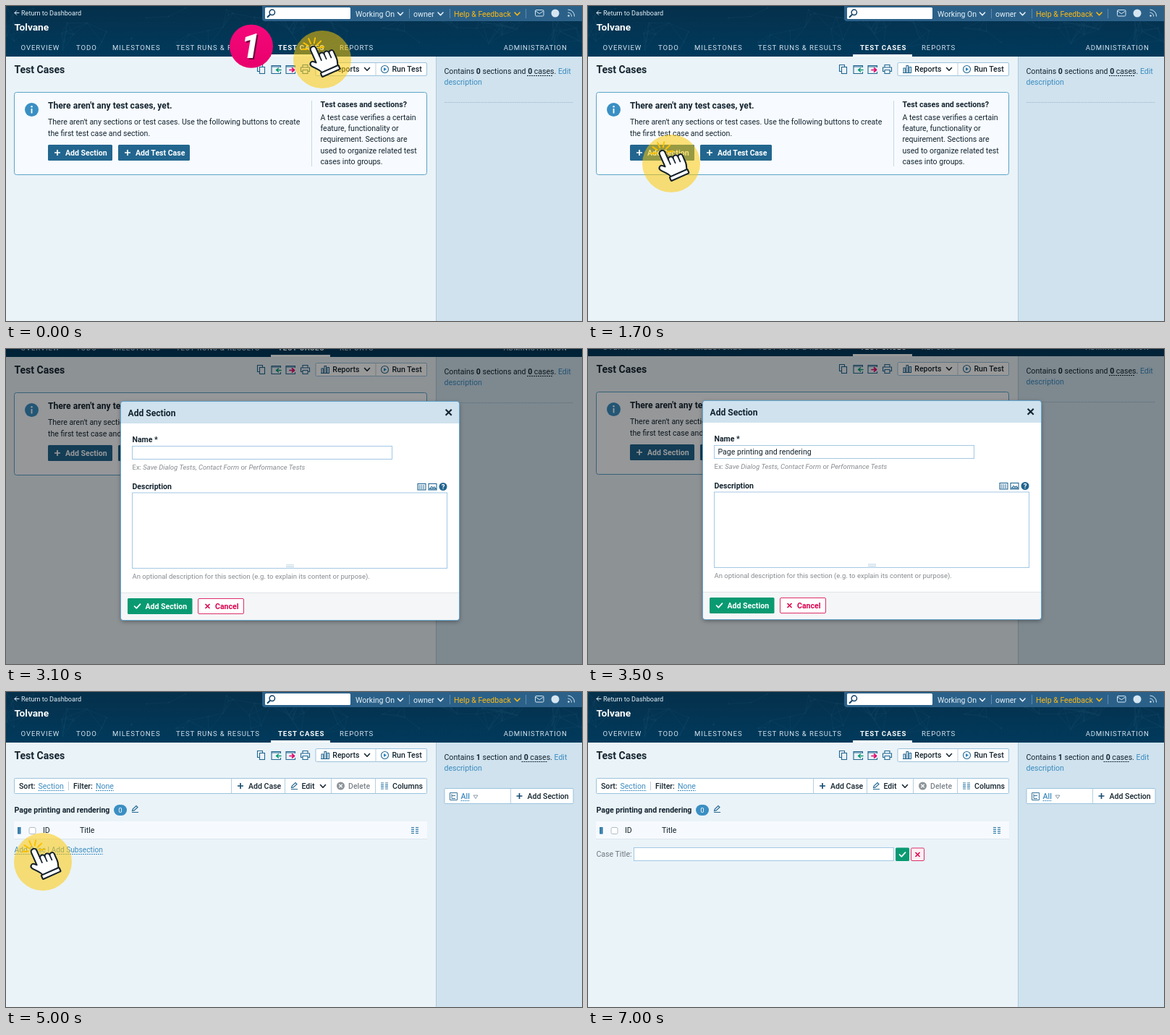
Write an HTML page that moves like this. It is 796x436 px and loops after 8 s.

```html
<!DOCTYPE html>
<html lang="en">
<head>
<meta charset="utf-8">
<title>Adding a section</title>
<style>
html, body { margin: 0; width: 100%; height: 100%; overflow: hidden; background: #eaf3f8; }
svg { display: block; }
text { font: 10.55px Roboto, Arial, sans-serif; fill: #14242f; white-space: pre; }
.m { font-weight: 500; }
.b { font-weight: 700; }
.white { fill: #fff; }
.link { fill: #3c8cc0; }
.dash { stroke: #3c8cc0; stroke-dasharray: 2 1; }
.nav text { font-size: 9.6px; letter-spacing: .9px; fill: #d3e3ee; }
.nav .b { fill: #fff; }
.top text { fill: #e6f1f8; }
.hint { font-size: 9.5px; fill: #868b8f; }
.box { fill: #fff; stroke: #9cc3dc; }
.field { fill: #fff; stroke: #a3c8e4; }
.rule { stroke: #b7d0e0; }
.ico { fill: none; stroke: #236791; stroke-width: 1.1; }
.btn { fill: #22668f; }
.pen { fill: none; stroke-linecap: round; stroke-linejoin: round; }
.digit { font: italic 800 47px Roboto, Arial, sans-serif; }
</style>
</head>
<body>
<svg width="796" height="436" viewBox="0 0 796 436">
<defs>
  <linearGradient id="navy" x2="0" y2="1"><stop stop-color="#05304b"/><stop offset="1" stop-color="#013a5c"/></linearGradient>
  <linearGradient id="pink" x2="0" y2="1"><stop stop-color="#f5087a"/><stop offset="1" stop-color="#e8006c"/></linearGradient>
  <filter id="soft" x="-20%" y="-20%" width="140%" height="150%"><feDropShadow dx="0" dy="2" stdDeviation="3" flood-opacity=".4"/></filter>
  <path id="chev" class="pen" d="M-3.5 -2 0 1.7 3.5 -2" stroke-width="1.6"/>
  <path id="plus" d="M-4 0H4M0 -4V4" stroke-width="1.7"/>
  <path id="tick" class="pen" d="M-4 0 -1.2 2.8 4 -2.8" stroke="#fff" stroke-width="1.7"/>
  <path id="cross" d="M-3 -3 3 3M3 -3 -3 3" stroke-width="1.6"/>
  <path id="pencil" class="ico" d="M-4 4H5M-3.5 2 -2.8 -.5 2 -5 4 -3 -.8 1.4Z"/>
  <path id="cols" d="M-5 -4H-1M1 -4H5M-5 -1.3H-1M1 -1.3H5M-5 1.4H-1M1 1.4H5M-5 4H-1M1 4H5" stroke="#2a75a5" stroke-width="1.2"/>
</defs>

<g id="view">
<g id="page">
  <rect width="796" height="510" fill="#eaf3f8"/>
  <rect x="594" y="70" width="202" height="440" fill="#cfe2ee"/>
  <path d="M594.5 70V510" stroke="#aecbdc"/>
  <rect width="796" height="70" fill="url(#navy)"/>
  <g id="web" stroke="#69b4d2" fill="#69b4d2" stroke-width=".6" opacity=".09"/>

  <g class="top">
    <path d="M354 0H796V21H358Q354 21 354 17Z" fill="#2b6189"/>
    <rect x="358" y="2" width="118" height="16" rx="1.5" fill="#fff"/>
    <g fill="none" stroke="#17456a" stroke-width="1.5"><circle cx="367.8" cy="8.8" r="3.7"/><path d="M365 11.7 361 15.7" stroke-width="2"/></g>
    <path d="M18 9.5H12M14.7 6.7 12 9.5 14.7 12.3" class="pen" stroke="#e6f1f8"/>
    <text x="21" y="12.8" style="font-size:9.1px">Return to Dashboard</text>
    <text x="11.5" y="34.3" class="b" style="font-size:13.7px;fill:#fff">Tolvane</text>
    <text x="483" y="14.8">Working On</text>
    <text x="563" y="14.8">owner</text>
    <text x="619" y="14.8" style="fill:#fdb913">Help &amp; Feedback</text>
    <g stroke="#e6f1f8"><use href="#chev" x="545" y="11"/><use href="#chev" x="600.5" y="11"/></g>
    <use href="#chev" x="706.5" y="11" stroke="#fdb913"/>
    <path d="M557.5 4V17M613.5 4V17M718.5 4V17" stroke="#5d8cad"/>
    <g fill="none" stroke="#d5e6f1"><rect x="731.5" y="5.5" width="11.5" height="8.5" rx="1.5"/><path d="M732 7 737.2 10.7 742.5 7"/>
      <path d="M776.5 5A9 9 0 0 1 785.5 14.5M776.5 9A5 5 0 0 1 781.5 14.5"/></g>
    <circle cx="777.5" cy="13.5" r="1.2" fill="#d5e6f1"/>
    <circle cx="759" cy="10" r="5.5" fill="#d5e6f1"/>
  </g>
  <g class="nav">
    <text x="20.5" y="60.8">OVERVIEW</text>
    <text x="97" y="60.8">TODO</text>
    <text x="147" y="60.8">MILESTONES</text>
    <text x="235" y="60.8">TEST RUNS &amp; RESULTS</text>
    <text x="376" y="60.8" class="b">TEST CASES</text>
    <text x="461" y="60.8">REPORTS</text>
    <text x="775.5" y="60.8" text-anchor="end" style="letter-spacing:.72px">ADMINISTRATION</text>
    <rect x="366" y="67" width="82" height="3" fill="#fff"/>
  </g>

  <text x="11.5" y="93" class="b" style="font-size:14px">Test Cases</text>
  <g class="ico">
    <path d="M350 90.5H347.5V81.5H354.5V84"/><rect x="350.5" y="84.5" width="7" height="9"/>
    <path d="M379.5 85V82.5H367V93.5H379.5V91M367 84H379.5M399.5 85V82.5H387V93.5H399.5V91M387 84H399.5"/>
    <path d="M410 85V81.5H417V85M410 90.5H407.5V85H419.5V90.5H417M410 88.5H417V93.5H410Z"/>
  </g>
  <path d="M380 88.5H374M376.5 86 373.5 88.5 376.5 91" class="pen" stroke="#0a9a72" stroke-width="1.5"/>
  <path d="M392 88.5H398M395.5 86 398.5 88.5 395.5 91" class="pen" stroke="#e0006c" stroke-width="1.7"/>
  <rect x="428" y="78.5" width="153.5" height="18" rx="1.5" class="box"/>
  <path d="M511 78.5V96.5" class="rule"/>
  <path d="M435 92.5H447M436 92V86H438.5V92M440 92V82.5H442.5V92M444 92V84.5H446.5V92" class="ico"/>
  <text x="451.3" y="91.3" class="m">Reports</text>
  <use href="#chev" x="499" y="87.5" stroke="#14242f"/>
  <circle cx="523.5" cy="87.5" r="5" class="ico"/><path d="M522 85V90L526 87.5Z" fill="#2a86c0"/>
  <text x="533.5" y="91.3" class="m">Run Test</text>

  <g data-on="01234">
    <text x="605.5" y="93.8">Contains <tspan class="b">0</tspan> sections and <tspan class="b">0</tspan> cases. <tspan class="link">Edit</tspan></text>
    <path d="M720 96.5H756" class="dash" style="stroke:#14242f"/>
    <path d="M606 133.5H784" stroke="#a3bccb" stroke-dasharray="1.5 1"/>
    <rect x="11.5" y="119.5" width="570" height="114" rx="3" fill="#f7fbff" stroke="#5ba3c8"/>
    <path d="M422.5 131V222" stroke="#c8d8e3"/>
    <circle cx="35.5" cy="143.5" r="9.5" fill="#3a8fc3"/>
    <path d="M35.5 142V148.5" stroke="#fff" stroke-width="1.8"/><circle cx="35.5" cy="139.3" r="1.2" fill="#fff"/>
    <text x="58" y="142.3" class="b" style="font-size:12.1px">There aren't any test cases, yet.</text>
    <text x="58" y="164.3">There aren't any sections or test cases. Use the following buttons to create</text>
    <text x="58" y="179.5">the first test case and section.</text>
    <text x="434.5" y="140.3" class="b">Test cases and sections?</text>
    <text x="434.5" y="157.8">A test case verifies a certain</text>
    <text x="434.5" y="173">feature, functionality or</text>
    <text x="434.5" y="188.3">requirement. Sections are</text>
    <text x="434.5" y="203.5">used to organize related test</text>
    <text x="434.5" y="218.8">cases into groups.</text>
    <rect x="58" y="192" width="89" height="22" rx="1.5" class="btn"/>
    <rect x="155" y="192" width="99" height="22" rx="1.5" class="btn"/>
    <g stroke="#fff"><use href="#plus" x="71" y="203"/><use href="#plus" x="168" y="203"/></g>
    <text x="82" y="206.8" class="b white">Add Section</text>
    <text x="179" y="206.8" class="b white">Add Test Case</text>
  </g>
  <text x="605.5" y="109" class="link">description</text>

  <g data-on="56">
    <text x="605.5" y="93.8">Contains <tspan class="b">1</tspan> section and <tspan class="b">0</tspan> cases. <tspan class="link">Edit</tspan></text>
    <path d="M712.5 96.5H748.5" class="dash" style="stroke:#14242f"/>
    <rect x="606" y="133.5" width="178" height="21" rx="1" class="box"/>
    <rect x="11.5" y="119.5" width="570" height="21" rx="1" class="box"/>
    <path d="M697.5 134V154M311.5 120V140M385.5 120V140M449.5 120V140M510.5 120V140M86.5 124V136" class="rule"/>
    <path d="M613.5 139.5H623.5V149.5H613.5ZM616 141V147.5H621M616 143.5H621" class="ico" style="stroke-width:.9"/>
    <text x="628.5" y="148" class="link m">All</text>
    <path d="M646 143H652L649 147.5Z" fill="none" stroke="#8a9aa6"/>
    <g stroke="#174e73"><use href="#plus" x="709.5" y="144"/><use href="#plus" x="324" y="130"/></g>
    <text x="720.5" y="148" class="m">Add Section</text>
    <text x="18" y="133.8" class="m">Sort:</text><text x="44.5" y="133.8" class="link">Section</text>
    <text x="93" y="133.8" class="m">Filter:</text><text x="124" y="133.8" class="link">None</text>
    <path d="M44.5 136.5H81M124 136.5H149M628.5 150.5H641" class="dash"/>
    <text x="335" y="133.8" class="m">Add Case</text>
    <use href="#pencil" x="398" y="130.5"/>
    <text x="408.5" y="133.8" class="m">Edit</text>
    <use href="#chev" x="438" y="130.5" stroke="#14242f"/>
    <circle cx="462.5" cy="130" r="5.5" fill="#8d9499"/><use href="#cross" stroke="#fff" transform="translate(462.5 130) scale(.75)"/>
    <text x="473" y="133.8" class="m" style="fill:#7c858b">Delete</text>
    <use href="#cols" x="523" y="130"/>
    <text x="534" y="133.8" class="m">Columns</text>
    <text x="11.5" y="166.8" class="b">Page printing and rendering</text>
    <rect x="149" y="156" width="18" height="15" rx="7.5" fill="#3a8fc3"/>
    <text x="158" y="167" text-anchor="middle" class="white" style="font-size:9.5px">0</text>
    <use href="#pencil" x="178" y="162.5"/>
    <rect x="11" y="179" width="571" height="25" fill="#f6fafe"/>
    <path d="M11 203.5H582" stroke="#dbe5ec"/>
    <rect x="16" y="187" width="4.5" height="9.5" fill="#2a75a5"/><path d="M18.2 188V196" stroke="#8fc0e0" stroke-dasharray="1 1"/>
    <rect x="32" y="187.5" width="9" height="9" rx="2" fill="#fff" stroke="#b3bcc3"/>
    <text x="51" y="195.3">ID</text><text x="102" y="195.3">Title</text>
    <use href="#cols" x="565" y="191.5"/>
  </g>
  <g data-on="5">
    <text x="11.5" y="222" class="link" style="font-size:10.2px">Add Case | Add Subsection</text>
    <path d="M11.5 224.5H55M61 224.5H134" class="dash"/>
  </g>
  <g data-on="6">
    <text x="11.5" y="228" style="fill:#6d777e">Case Title:</text>
    <rect x="63.5" y="215.5" width="359" height="18" class="field"/>
    <rect x="425" y="215.5" width="19" height="18.5" rx="1.5" fill="#0a9a72"/><use href="#tick" x="434.5" y="225"/>
    <rect x="446.5" y="216" width="18" height="17.5" rx="1.5" fill="#fdf0f4" stroke="#dd2e68"/><use href="#cross" x="455.5" y="225" stroke="#d8004f"/>
  </g>
</g>

<g data-on="234">
  <rect y="-2" width="796" height="440" opacity=".4"/>
  <rect x="159" y="72" width="467" height="302" rx="3" fill="#fff" filter="url(#soft)"/>
  <path d="M159 102V75Q159 72 162 72H623Q626 72 626 75V102Z" fill="#cfe2ee"/>
  <path d="M159 336H626V371Q626 374 623 374H162Q159 374 159 371Z" fill="#f5f6f7"/>
  <path d="M159 336.5H626" stroke="#dfe5e9"/>
  <rect x="158.5" y="71.5" width="468" height="303" rx="3" fill="none" stroke="#64a5cd"/>
  <text x="168.5" y="92.3" class="b" style="font-size:12.1px">Add Section</text>
  <use href="#cross" stroke="#14242f" transform="translate(611.7 86.7) scale(1.35)"/>
  <text x="174.5" y="128" class="b">Name *</text>
  <rect x="174.5" y="133.5" width="359" height="18" class="field"/>
  <text data-on="34" x="179.5" y="146.3">Page printing and rendering</text>
  <text x="174.5" y="165.8" class="hint">Ex: <tspan font-style="italic">Save Dialog Tests, Contact Form </tspan>or <tspan font-style="italic">Performance Tests</tspan></text>
  <text x="174.5" y="193" class="b">Description</text>
  <g class="ico"><rect x="569" y="185.5" width="11" height="8.5"/><path d="M570.5 188H578.5M570.5 190H578.5M570.5 192H578.5" stroke-dasharray="2 .8"/>
    <rect x="584" y="185.5" width="11" height="8.5"/><path d="M585.5 192.5 588 189.5 590 191 592 190 594 192.5Z"/></g>
  <circle cx="604" cy="189.5" r="5.5" class="btn"/><text x="604" y="193" text-anchor="middle" class="b white" style="font-size:9.5px">?</text>
  <rect x="174.5" y="198" width="435" height="104.5" class="field"/>
  <path d="M387 298H398M387 300.5H398" stroke="#b5cfdf" stroke-width="1.2"/>
  <text x="174.5" y="316.8" class="hint">An optional description for this section (e.g. to explain its content or purpose).</text>
  <rect x="168" y="344" width="89.5" height="22" rx="1.5" fill="#0a9a72"/>
  <use href="#tick" x="181.5" y="355"/>
  <text x="192.5" y="358.8" class="b white">Add Section</text>
  <rect x="265.5" y="344.5" width="63" height="21" rx="1.5" fill="#fff" stroke="#dd2e68"/>
  <use href="#cross" x="278.5" y="355" stroke="#d8004f"/>
  <text x="289" y="358.8" class="b" style="fill:#d8004f">Cancel</text>
</g>
</g>

<g data-on="0" text-anchor="middle">
  <circle cx="339" cy="55.8" r="30" fill="url(#pink)"/>
  <text x="340" y="73.5" class="digit" style="fill:#6d0a3c">1</text>
  <text x="338" y="72" class="digit white">1</text>
</g>

<g id="cursor" data-on="0145">
  <circle r="40" fill="#ffc900" opacity=".53"/>
  <g transform="translate(-14 -18) rotate(-24) scale(1.08)">
    <g id="rays" class="pen" stroke="#fbc000" stroke-width="1.8"/>
    <g fill="#fff" stroke="#15212b" stroke-width="1.9" stroke-linejoin="round">
      <path d="M-3.7 4a3.7 3.7 0 0 1 7.4 0V15a3.2 3.2 0 0 1 6.4 .5a3.2 3.2 0 0 1 6.4 1a3 3 0 0 1 6 1.5V26C22.5 31 20.5 33 20 36H-2C-3 31 -8 27 -11 22.5C-13 18.5 -8 16 -5.8 19L-3.7 21Z"/>
      <path d="M3.7 14V21M10.1 16V22M16.5 17V23" stroke-width="1.6" stroke-linecap="round"/>
      <rect x="-4" y="35.5" width="25" height="5.5" rx="1"/>
    </g>
  </g>
</g>
</svg>
<script>
const cuts = [0, 500, 2500, 3500, 4000, 5000, 7000], loop = 8000;
const clicks = { 0: [437, 74], 1: [115, 218], 4: [228, 373], 5: [51, 235] };
const $ = id => document.getElementById(id);
const parts = document.querySelectorAll('[data-on]');

// Faint network behind the header
let seed = 11;
const rnd = () => (seed = seed * 16807 % 2147483647) / 2147483647;
const nodes = Array.from({ length: 90 }, () => [rnd() * 796, rnd() * 62]);
$('web').innerHTML = nodes.map(([x, y], i) =>
  `<circle cx="${x}" cy="${y}" r=".8"/>` + nodes.slice(i + 1)
    .filter(([u, v]) => Math.hypot(u - x, v - y) < 34)
    .map(([u, v]) => `<path d="M${x} ${y}L${u} ${v}"/>`).join('')).join('');

$('rays').innerHTML = [-70, -35, 0, 35, 70, 105]
  .map(a => `<path d="M0 -7V-14" transform="translate(0 3) rotate(${a})"/>`).join('');

function draw() {
  const t = performance.now() % loop;
  const scene = cuts.findLastIndex(c => t >= c);
  for (const p of parts) p.style.display = p.dataset.on.includes(scene) ? '' : 'none';
  const modal = scene > 1 && scene < 5;
  $('page').setAttribute('transform', `translate(0 ${modal ? -60 : 0})`);
  $('view').setAttribute('transform', `translate(0 ${scene === 2 ? 1 : 0})`);
  if (clicks[scene]) $('cursor').setAttribute('transform', `translate(${clicks[scene]})`);
  requestAnimationFrame(draw);
}
draw();
</script>
</body>
</html>
```
